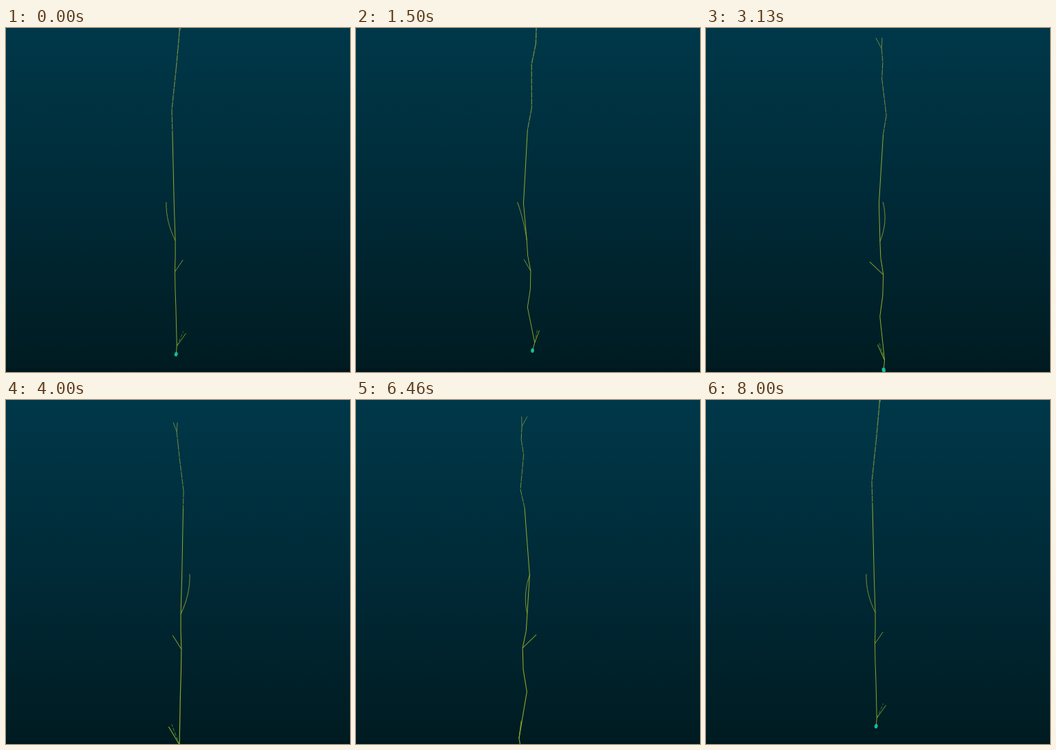
Write an HTML page with a canvas that moves like this. It is 500 by 500 pixels and loops after 8040 ms.

```html
<!DOCTYPE html>
<html>
<head>
<meta charset="utf-8">
<style>
html, body { margin: 0; width: 100%; height: 100%; overflow: hidden; background: #001b21; }
canvas { display: block; }
</style>
</head>
<body>
<canvas width="500" height="500"></canvas>
<script>
const ctx = document.querySelector('canvas').getContext('2d');
const LOOP = 8040, FPS = 24, TURN = 192;
const CX = 250, CY = 258, TILT = 5.5e-4, PHASE = Math.PI / 4;

// Points in space are [height, x, z]; the cell turns about the vertical axis.
const fork = [-231, 2, 10.8], armNode = [52, -4, -.3], twigNode = [100, -4.7, 6.4];
const base = [222, -1.9, 12.5], soma = [236, -3, 9.2];
const trunk = [
  fork, [-210, 0, 11], [-186, -2.4, 6.1], [-132, -8.5, 8.9], [-104, -7.8, 2.5],
  [-3, -5.7, -4.7], armNode, [76, -4, 1.3], twigNode, [130, -4.2, 5.6], [160, -3.2, .5],
  base, soma
];
const arm = curve(armNode, [24, -17.8, 1.5], [-5, -17.1, -9.5]);

function curve(from, bend, to, parts = 8) {
  return Array.from({ length: parts + 1 }, (_, i) => {
    const t = i / parts, u = 1 - t;
    return from.map((v, k) => u * u * v + 2 * u * t * bend[k] + t * t * to[k]);
  });
}

const sky = ctx.createLinearGradient(0, 0, 0, 500);
['#003849', '#002a37', '#001b21'].forEach((color, i) => sky.addColorStop(i / 2, color));

// The tilted axis brings each point nearer and farther once per turn.
function project([h, x, z], angle) {
  const scale = 1 / (1 + TILT * h * Math.cos(angle - PHASE));
  return {
    x: CX + scale * (x * Math.cos(angle) + z * Math.sin(angle)),
    y: CY + scale * h,
    scale
  };
}

function fibre(points, angle, color, dash = []) {
  const p = points.map(q => project(q, angle));
  ctx.strokeStyle = color;
  ctx.setLineDash(dash);
  for (let i = 1; i < p.length; i++) {
    ctx.lineWidth = Math.max(.95, p[i].scale ** 2);
    ctx.beginPath();
    ctx.moveTo(p[i - 1].x, p[i - 1].y);
    ctx.lineTo(p[i].x, p[i].y);
    ctx.stroke();
  }
}

function draw(now) {
  const step = Math.floor((now % LOOP + 5) * FPS / 1000);
  const angle = step / TURN * 2 * Math.PI;
  ctx.fillStyle = sky;
  ctx.fillRect(0, 0, 500, 500);
  ctx.fillStyle = 'rgba(0,16,20,.35)';
  ctx.fillRect(0, 495, 500, 5);

  fibre([base, [197, 8.5, 13]], angle, '#2f7a38', [5, 2]);
  fibre([base, [200, 12.5, 14.5]], angle, '#7ea02c');
  fibre(arm, angle, '#789030');
  fibre([twigNode, [81.5, 7.5, -9.8]], angle, '#7f9d2a');
  fibre([fork, [-247, 7.5, 4]], angle, '#6d8848');
  fibre([fork, [-247, 1, 10.8]], angle, '#6d8848');
  fibre(trunk.slice(0, 5), angle, '#7b9242', [9, 1]);
  fibre(trunk.slice(4), angle, '#8fab2c');

  const s = project(soma, angle);
  ctx.fillStyle = '#12c095';
  ctx.beginPath();
  ctx.ellipse(s.x, s.y, 2.6 * s.scale, 3.6 * s.scale, .25 * Math.cos(angle), 0, 2 * Math.PI);
  ctx.fill();
}

const start = performance.now();
function tick() {
  draw(performance.now() - start);
  requestAnimationFrame(tick);
}
tick();
</script>
</body>
</html>
```
